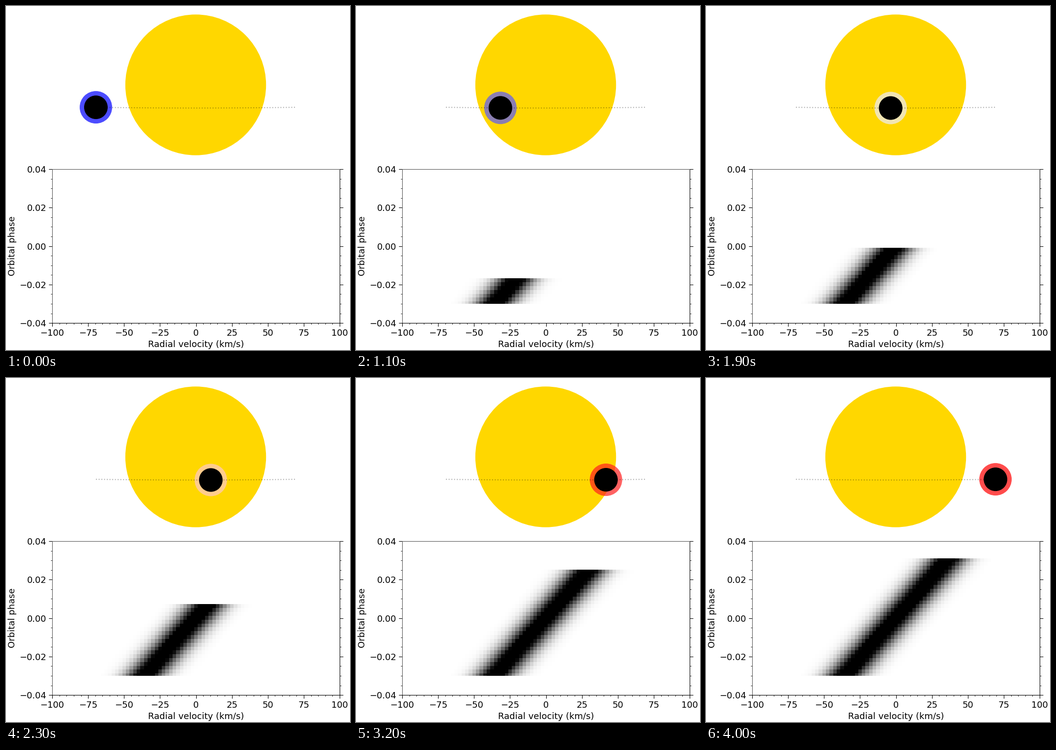
Write a matplotlib script that moves like this. It is 700 px wide and 700 px high and loops after 4.1 s.

```python
import numpy as np
import matplotlib.pyplot as plt
from matplotlib.animation import FuncAnimation
from matplotlib.patches import Circle
from matplotlib.ticker import AutoMinorLocator, MultipleLocator

SIZE = 700
FRAMES = 41
STAR = (386, 160.5)
ORBIT = (816.5, 47.1)      # projected semi-axes in pixels
VELOCITY = 190             # orbital velocity amplitude, km/s
LINE_WIDTH = 9.3           # km/s
LINE_DEPTH = 1.2           # above 1 the core saturates to black
COLOR_PHASE = 0.0275       # phase where the shell colour saturates
FIRST, LAST = 5, 35        # rows observed during the transit

plt.rcParams.update({"font.family": "DejaVu Sans", "font.size": 13})

phases = np.linspace(-0.04, 0.04, FRAMES)


def planet_pos(phase):
    angle = 2 * np.pi * phase
    return (STAR[0] + ORBIT[0] * np.sin(angle),
            STAR[1] + ORBIT[1] * np.cos(angle))


def shell_color(phase):
    return plt.cm.bwr(0.5 + 0.5 * np.clip(phase / COLOR_PHASE, -1, 1))


fig = plt.figure(figsize=(7, 7), dpi=100, facecolor="white")

# Sky view, in pixel coordinates
sky = fig.add_axes([0, 0, 1, 1])
sky.set(xlim=(0, SIZE), ylim=(SIZE, 0))
sky.axis("off")
sky.add_patch(Circle(STAR, 143.2, color="gold", lw=0))
sky.plot(*planet_pos(phases), ":", color="black", alpha=0.3, lw=1.5)
shell = sky.add_patch(Circle((0, 0), 33, alpha=0.7, lw=0))
planet = sky.add_patch(Circle((0, 0), 24, color="black", lw=0, zorder=3))

# Velocity map
ax = fig.add_axes([94.1 / SIZE, 54.9 / SIZE, 585 / SIZE, 313 / SIZE])
ax.patch.set_alpha(0)
ax.set(xlim=(-100, 100), ylim=(-0.04, 0.04),
       xlabel="Radial velocity (km/s)", ylabel="Orbital phase")
ax.xaxis.set_major_locator(MultipleLocator(25))
ax.yaxis.set_major_locator(MultipleLocator(0.02))
ax.xaxis.set_minor_locator(AutoMinorLocator(5))
ax.yaxis.set_minor_locator(AutoMinorLocator(4))
ax.tick_params(which="major", length=5)
ax.tick_params(axis="y", which="both", right=True)
for side in ("top", "left"):
    ax.spines[side].set_color("0.35")

rows = phases[FIRST:LAST + 1]
speeds = np.linspace(-100, 100, 81)
row_edges = np.append(rows - 0.0008, rows[-1] + 0.0012)
row_edges[0] = -0.03
speed_edges = np.append(speeds - 1.25, speeds[-1] + 1.25)
centers = VELOCITY * np.sin(2 * np.pi * rows)[:, None]
signal = LINE_DEPTH * np.exp(-0.5 * ((speeds - centers) / LINE_WIDTH) ** 2)
mesh = ax.pcolormesh(speed_edges, row_edges, np.zeros_like(signal),
                     cmap="gray_r", vmin=0, vmax=1)


def update(i):
    center = planet_pos(phases[i])
    shell.center = planet.center = center
    shell.set_facecolor(shell_color(phases[i]))
    seen = np.arange(FIRST, LAST + 1) <= i
    mesh.set_array(np.where(seen[:, None], signal, 0))
    return shell, planet, mesh


anim = FuncAnimation(fig, update, frames=FRAMES, interval=100,
                     repeat=True, repeat_delay=0, blit=False)
plt.show()
```
